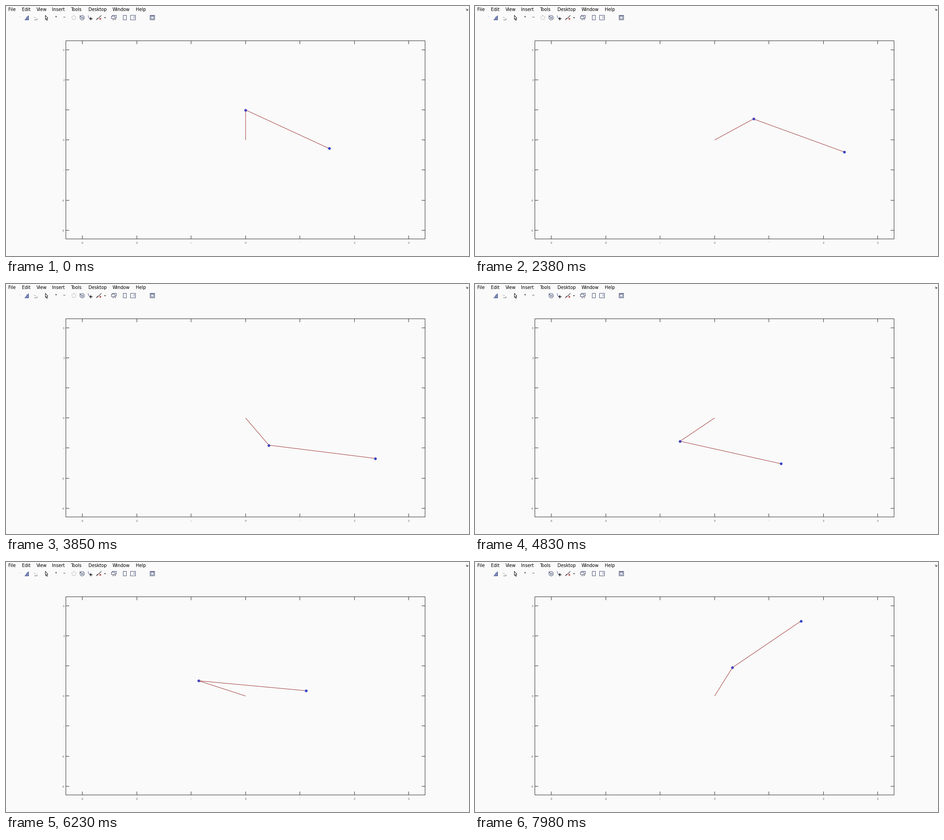
A matplotlib script for the animation above (8 s loop, 1017x550 px).

```python
import numpy as np
import matplotlib.pyplot as plt
from matplotlib.animation import FuncAnimation
from matplotlib.patches import Circle, Polygon, Rectangle

W, H, DPI = 1017, 550, 64
PT = 72 / DPI                    # points per pixel
LOOP, TICK, STEP = 8000, 20, 70  # ms
BG, INK, NAVY = "#fafafa", "#303030", "#4a5478"

# Coordinates are given at pixel centres, so no extra snapping is wanted.
plt.rcParams["path.snap"] = False

fig = plt.figure(figsize=(W / DPI, H / DPI), dpi=DPI, facecolor=BG)
ax = fig.add_axes([0, 0, 1, 1])
ax.set_xlim(0, W)
ax.set_ylim(H, 0)
ax.axis("off")


def line(xs, ys, color=INK, width=1.0, **kw):
    kw.setdefault("solid_capstyle", "butt")
    return ax.plot(xs, ys, color=color, lw=width * PT, snap=False, **kw)[0]


def shape(patch):
    patch.set_snap(False)
    ax.add_patch(patch)


def box(x0, y0, x1, y1, color=NAVY, fill="none"):
    shape(Rectangle((x0, y0), x1 - x0, y1 - y0, fc=fill, ec=color, lw=PT))


def label(x, y, text, size, color="black", **kw):
    ax.text(x, y, text, fontsize=size * PT, color=color, va="baseline", **kw)


# --- menu bar ---
MENU = [(5.5, "File"), (35, "Edit"), (67, "View"), (101.5, "Insert"),
        (142, "Tools"), (181, "Desktop"), (233.5, "Window"), (284.5, "Help")]
for x, word in MENU:
    label(x, 11.3, word, 9.8, family="DejaVu Sans")
line([1010.5, 1014], [6, 9.5])
line([1014.5, 1014.5, 1011], [6.5, 9.5, 9.5])


# --- toolbar ---
def toolbar():
    # save
    shape(Polygon([(41, 30.5), (50, 30.5), (50, 21), (46, 23)], fc="#8f9cc4", ec="none"))
    line([41, 49.5, 49.5], [30.5, 30.5, 21], "#26337a")
    line([43.5, 46.5, 46.5], [27.5, 27.5, 23], "#4a5796")
    # print
    line([61, 64, 66], [24.5, 25.5, 27], "#b0b0b0")
    line([62, 68, 68.5], [30.5, 30.5, 27.5], "#707070")
    # pointer
    shape(Polygon([(86.5, 20.5), (86.5, 29.5), (88.3, 28), (89.7, 31.5), (91, 31),
                   (89.8, 27.3), (92, 27)], fc="white", ec="black", lw=0.9 * PT))
    # zoom signs
    line([108, 112], [23.5, 23.5], "#555555")
    line([110, 110], [21.5, 25.5], "#555555")
    line([126, 130.5], [24.5, 24.5], "#555555")
    # rotate
    shape(Circle((167.3, 25.7), 4.9, fc="none", ec=NAVY, lw=PT))
    box(165.5, 24.5, 169.5, 27.5)
    line([162.5, 162.5, 165], [20.5, 23.5, 23.5], NAVY)
    # data cursor
    line([180.5, 181, 183, 186], [20.5, 24, 26.5, 28], "#5060a0")
    line([183, 190], [28, 28], "black", 1.3)
    line([186.3, 186.3], [24.5, 31.5], "black", 1.3)
    # brush
    line([209.5, 204], [20.5, 26], "#404040", 1.2)
    line([204, 198.5, 201.5], [26, 30.5, 26], "#5a3838")
    shape(Rectangle((205.5, 26.5), 3.5, 3.5, fc="#b85858", ec="none"))
    shape(Polygon([(215.5, 25), (219.5, 25), (217.5, 27)], fc="black", ec="none"))
    # linked windows
    box(233.5, 20.5, 242.5, 26.5)
    box(231.5, 22.5, 239.5, 27.5, NAVY, BG)
    line([234, 237], [30, 30], "#505050", 1.4)
    line([238.5, 241.5], [29.5, 29.5], "#505050", 1.4)
    # color bar, legend
    box(257.5, 20.5, 264.5, 30.5)
    box(273.5, 20.5, 284.5, 30.5)
    line([280, 283], [23.5, 23.5], NAVY)
    line([280, 283], [26.5, 26.5], NAVY)
    # dock
    box(316.5, 20.5, 326.5, 30.5)
    box(318.5, 22.5, 324.5, 28.5)
    line([317, 326], [21.5, 21.5], "#a0a6bc")


toolbar()
turn = np.linspace(0, 2 * np.pi, 60)
reach = 4.2 + 0.9 * np.cos(5 * turn)
hand = line(149 + reach * np.sin(turn), 25.7 - reach * np.cos(turn), "#808080", 0.9,
            linestyle=(0, (1.2, 1.5)))
dot = line([30, 31.2], [23.5, 23.5], "#909090")

# --- plot frame ---
X0, Y0, SX, SY = 526.3, 294.8, 119.55, 66.1
LEFT, RIGHT, TOP, BOTTOM = 131.5, 920.5, 76.5, 512.5
box(LEFT, TOP, RIGHT, BOTTOM, INK)
for v in range(-3, 4):
    x, y = np.floor(X0 + SX * v) + 0.5, np.floor(Y0 - SY * v) + 0.5
    line([x, x], [TOP, TOP + 7.5])
    line([x, x], [BOTTOM, BOTTOM - 7.5])
    line([LEFT, LEFT + 7.5], [y, y])
    line([RIGHT, RIGHT - 7.5], [y, y])
    text = str(v).replace("1", "'")  # the tiny 1 shows only its flag
    style = dict(size=6.4, color="#505050", family="Liberation Sans")
    label(x, 523, text, ha="center", **style)
    label(128.8, y + 2.6, text, ha="right", **style)

# --- two-link arm: step numbers and link angles in degrees ---
KNOTS = np.array([0, 20, 34, 55, 69, 89, 96, 108, 114])
UPPER = np.array([90, 73.3, 44.5, -64.7, -129.4, -210.4, -230, -270.5, -289.1])
LOWER = np.array([-39.9, -36.8, -33.4, -12.7, -22, -9.5, 10.5, 39.5, 50.9])
L1, L2 = 1, 2


def smooth(k, angles):
    """Cubic Hermite curve through the knots, starting from rest."""
    slope = np.gradient(angles, KNOTS, edge_order=2)
    slope[0] = 0
    i = min(np.searchsorted(KNOTS, k, side="right") - 1, len(KNOTS) - 2)
    h = KNOTS[i + 1] - KNOTS[i]
    u = (k - KNOTS[i]) / h
    a, b = angles[i], angles[i + 1]
    value = (a + (b - a) * u * u * (3 - 2 * u)
             + h * u * (1 - u) * (slope[i] * (1 - u) - slope[i + 1] * u))
    return np.radians(value)


arm = line([], [], "#a03838", zorder=4)
joint, tip = (ax.plot([], [], "o", ms=5.2 * PT, mfc=color, mec="#2a34a8",
                      mew=0.6 * PT, zorder=5, snap=False)[0]
              for color in ("#4a40c4", "#3044d4"))


def update(n):
    k = min((n * TICK + TICK // 2) // STEP, KNOTS[-1])
    a, b = smooth(k, UPPER), smooth(k, LOWER)
    xs = X0 + SX * np.cumsum([0, L1 * np.cos(a), L2 * np.cos(b)])
    ys = Y0 - SY * np.cumsum([0, L1 * np.sin(a), L2 * np.sin(b)])
    arm.set_data(xs, ys)
    joint.set_data(xs[1:2], ys[1:2])
    tip.set_data(xs[2:], ys[2:])
    shown = not (65 <= k < 79 or k >= 111)
    hand.set_visible(shown)
    dot.set_visible(shown)
    return arm, joint, tip, hand, dot


anim = FuncAnimation(fig, update, frames=LOOP // TICK, interval=TICK,
                     repeat=True, repeat_delay=0)
plt.show()
```
